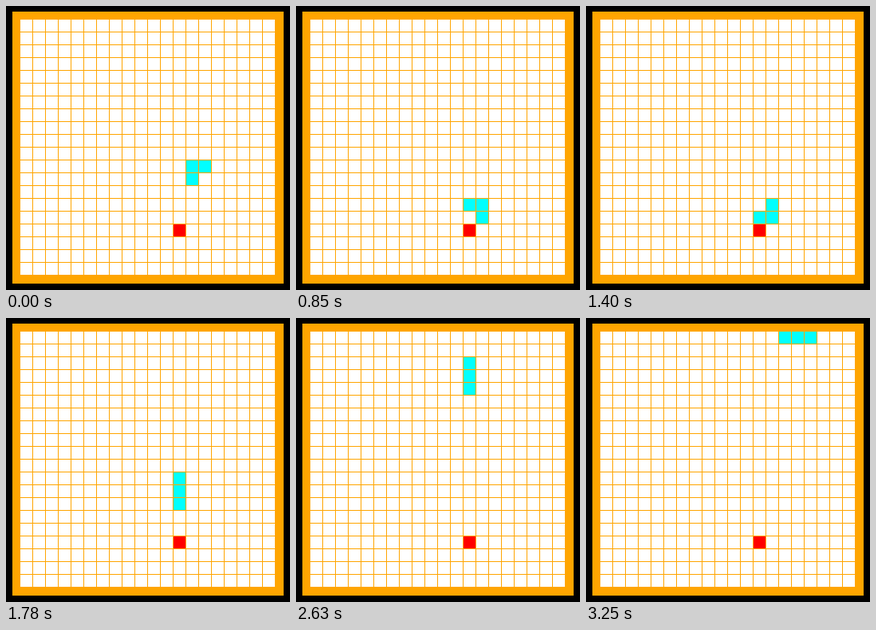
Recreate the animation shown at these times as an HTML page. Size 356 px wide and 355 px high, loop 3330 ms.

```html
<!DOCTYPE html>
<html lang="en">
<head>
<meta charset="utf-8">
<title>Snake</title>
<style>
html, body { margin: 0; width: 100%; height: 100%; overflow: hidden; background: #000; }
svg { display: block; width: 356px; height: 355px; }
</style>
</head>
<body>
<svg viewBox="0 0 356 355" shape-rendering="crispEdges">
  <rect width="356" height="355" fill="#000"/>
  <rect x="8" y="7" width="340" height="340" fill="#ffa500"/>
  <path id="board" fill="#fff"/>
  <path id="food" fill="#f00"/>
  <path id="snake" fill="#0ff"/>
</svg>
<script>
const CELL = 16, LEFT = 18, TOP = 17, COUNT = 20, LENGTH = 3;
const LOOP = 3330;
// The screen refreshes every TICK ms; the snake moves every PACE ticks,
// so now and then a refresh shows no move.
const TICK = 77.5, OFFSET = 8, PACE = 1.275, PHASE = 0.69;

const moves = "DLLDDRRULLDRRULUU" + "U".repeat(12) + "RRRR";
const steps = { U: [0, -1], D: [0, 1], L: [-1, 0], R: [1, 0] };

const trail = [[14, 11], [13, 11], [13, 12]];
for (const move of moves) {
  const [x, y] = trail[trail.length - 1];
  const [dx, dy] = steps[move];
  trail.push([x + dx, y + dy]);
}

const cell = ([col, row]) =>
  `M${LEFT + col * CELL} ${TOP + row * CELL}h${CELL - 1}v${CELL - 1}h${1 - CELL}z`;

function fill(id, cells) {
  document.getElementById(id).setAttribute("d", cells.map(cell).join(""));
}

function render(time) {
  const tick = Math.floor((time + OFFSET) / TICK);
  const done = Math.min(Math.floor((tick + PHASE) / PACE), moves.length);
  fill("snake", trail.slice(done, done + LENGTH));
}

fill("board", Array.from({ length: COUNT * COUNT }, (_, i) => [i % COUNT, Math.floor(i / COUNT)]));
fill("food", [[12, 16]]);
render(0);

const start = performance.now();
(function loop() {
  render((performance.now() - start) % LOOP);
  requestAnimationFrame(loop);
})();
</script>
</body>
</html>
```
